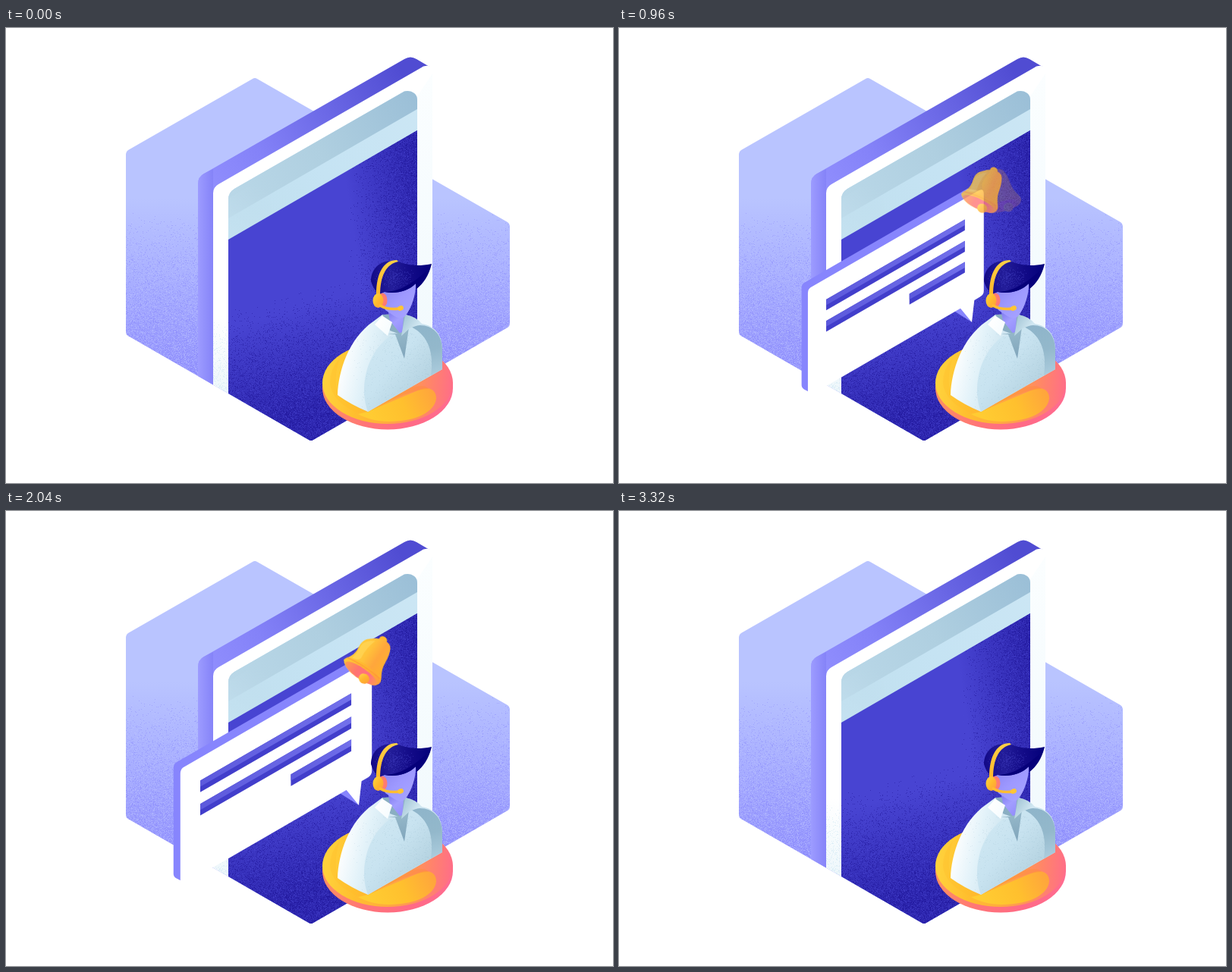
These frames come from a looping animation (800x600 px, 3.36 s). An HTML page with a canvas:

```html
<!DOCTYPE html>
<html lang="en">
<head>
<meta charset="utf-8">
<title>Support chat</title>
<style>
html, body { margin: 0; width: 100%; height: 100%; overflow: hidden; background: #fff; }
canvas { display: block; width: 800px; height: 600px; }
</style>
</head>
<body>
<canvas id="stage" width="800" height="600"></canvas>
<script>
const LOOP = 3360, STEP = 40;
const TIP = [465, 388], PIVOT = [500, 149];
const stage = document.getElementById('stage').getContext('2d');

let seed = 7;
const rnd = () => {
  seed = (Math.imul(seed, 1664525) + 1013904223) >>> 0;
  return seed / 4294967296;
};
const clamp = (x, a = 0, b = 1) => Math.min(b, Math.max(a, x));
const ease = x => x * x * (3 - 2 * x);
const part = (t, a, b) => clamp((t - a) / (b - a));
const P = d => new Path2D(d);

function layer() {
  const c = document.createElement('canvas');
  c.width = 800;
  c.height = 600;
  return c.getContext('2d');
}

function fill(g, d, style) {
  g.fillStyle = style;
  g.fill(P(d));
}

function line(g, d, style, width) {
  g.strokeStyle = style;
  g.lineWidth = width;
  g.lineCap = 'round';
  g.stroke(P(d));
}

function oval(g, x, y, rx, ry, style, turn = 0) {
  g.beginPath();
  g.ellipse(x, y, rx, ry, turn, 0, Math.PI * 2);
  g.fillStyle = style;
  g.fill();
}

function addStops(grad, colors) {
  colors.forEach((c, i) => grad.addColorStop(i / (colors.length - 1), c));
  return grad;
}
const lin = (g, x0, y0, x1, y1, ...c) => addStops(g.createLinearGradient(x0, y0, x1, y1), c);

// Speckled shading: density(x, y) is the chance of a dot on each pixel.
function grain(g, d, [x0, y0, x1, y1], color, density) {
  g.save();
  g.clip(P(d));
  g.fillStyle = color;
  for (let y = y0; y < y1; y++)
    for (let x = x0; x < x1; x++)
      if (rnd() < density(x, y)) g.fillRect(x, y, 1, 1);
  g.restore();
}

const HEX = 'M158 166Q158 163 161 161L325 67Q328 65 331 67L661 256Q664 258 664 261V390Q664 393 661 395L405 543Q402 545 399 543L161 406Q158 404 158 401Z';
const FLOOR = 'M0 0H800V315.5L405 543Q402 545 399 543L0 313Z';
const SIDE = 'M253 500V206Q253 196 261 192L525 41Q533 36 541 41L558 51L540 500Z';
const FACE = 'M273 500V218Q273 210 280 206L546 53Q551 49 557 50Q562 53 562 60V500Z';
const FOOT = 'M273 380H293V500H273Z';
const SCREEN = 'M293 560V226Q293 217 301 212L525 83.5Q533 82 538 86Q542 89 542 95V560Z';
const GLASS = 'M293 279L542 135V560H293Z';

function drawTablet(g) {
  fill(g, HEX, lin(g, 0, 225, 0, 450, '#b9c4ff', '#a8aeff', '#9494fd'));
  const low = (x, y) => 0.3 * part(y, 240, 430);
  grain(g, HEX, [158, 230, 664, 460], 'rgba(126,124,250,.35)', low);
  grain(g, HEX, [158, 250, 664, 460], 'rgba(190,198,255,.45)', low);

  g.save();
  g.clip(P(FLOOR));
  fill(g, SIDE, lin(g, 255, 240, 535, 80, '#9492ff', '#8482f8', '#6a67e5', '#504cd2'));
  fill(g, 'M253 500V206Q253 196 261 192L273 186V500Z', lin(g, 253, 0, 275, 0, 'rgba(158,157,255,.9)', 'rgba(128,126,246,.8)'));
  fill(g, FACE, '#fff');
  fill(g, 'M542 90L562 60V500H542Z', lin(g, 0, 60, 0, 400, '#fbfeff', '#f2fafd'));
  fill(g, FOOT, lin(g, 0, 380, 0, 480, '#fff', '#eef7fb'));
  grain(g, FOOT, [273, 380, 293, 490], 'rgba(200,228,242,.5)', (x, y) => 0.22 * part(y, 380, 480));

  fill(g, SCREEN, lin(g, 293, 260, 542, 115, '#c0dfee', '#c5e3f3', '#cbe6f4'));
  g.save();
  g.clip(P(SCREEN));
  fill(g, 'M293 251L542 107V70L293 205Z', lin(g, 293, 235, 542, 95, '#bad8e8', '#afcfe0', '#9bbfd7'));
  fill(g, 'M293 279L293 225L350 190V246Z', lin(g, 293, 270, 330, 205, 'rgba(200,228,243,.5)', 'rgba(190,218,233,0)'));
  g.restore();

  fill(g, GLASS, '#4844d2');
  fill(g, GLASS, lin(g, 455, 250, 550, 235, 'rgba(34,26,160,0)', 'rgba(34,26,160,.75)'));
  fill(g, GLASS, lin(g, 350, 380, 385, 505, 'rgba(34,26,160,0)', 'rgba(34,26,160,.7)'));
  const dark = (x, y) => Math.max(part(x, 450, 550), part(y + (x - 293) * 0.25, 370, 510));
  grain(g, GLASS, [293, 135, 542, 545], 'rgba(24,10,140,.4)', (x, y) => 0.28 * dark(x, y));
  grain(g, GLASS, [293, 135, 542, 545], 'rgba(74,71,212,.5)', (x, y) => 0.2 * dark(x, y));
  g.restore();
}

function drawDisc(g) {
  const rim = lin(g, 417, 0, 589, 0, '#ff8f60', '#ff7478', '#ff6a86', '#ff6c90');
  oval(g, 503, 475, 86, 54.5, rim);
  g.fillStyle = rim;
  g.fillRect(417, 467, 172, 8);
  oval(g, 503, 468, 86, 54, lin(g, 420, 450, 588, 462, '#ffd23c', '#ffbf2e', '#ffad3c', '#ff8f5c', '#ff6f86'));
  fill(g, 'M437 481Q431 462 440 435Q427 450 427 468Q429 494 469 510L477 506Z', 'rgba(255,184,40,.3)');
  fill(g, 'M477 506L545 477C557 472 567 477 567 488C566 505 542 519 505 519C490 519 474 515 464 509Z',
    lin(g, 480, 515, 567, 478, '#ffcc32', '#ffc02e', '#ffa23e'));
  fill(g, 'M477 506L535 474Q552 469 557 476Q536 475 477 506Z', 'rgba(255,140,64,.5)');
}

function drawBody(g) {
  const torso = 'M437 484C438 452 452 409 484 387L496 378L526 377L548 390C566 393 575 405 575 424V450L477 506Q455 497 437 484Z';
  fill(g, torso, lin(g, 440, 440, 505, 455, '#ffffff', '#e2f2f9', '#cbe3ef'));
  const front = 'M477 506C466 478 472 432 505 407L541 393C563 405 565 430 562 457Z';
  fill(g, front, lin(g, 480, 400, 560, 465, '#d0e8f3', '#c8e3f0', '#b4d2e0'));
  grain(g, torso, [437, 400, 575, 506], 'rgba(148,186,205,.2)', (x, y) => 0.12 * part(x, 450, 575));
  fill(g, 'M534 394C554 387 575 398 575 424V450L560 458.5C564 430 558 406 534 394Z',
    lin(g, 555, 392, 568, 455, '#8fb5ca', '#93b8cb', '#aacbdc'));
  fill(g, 'M496 378L526 377L540 388L520 404L506 399Z', '#8aaec2');
  fill(g, 'M503 370H525L522 406L506 386Z', lin(g, 503, 376, 522, 400, '#817cf0', '#a29eff', '#948ffb'));
  fill(g, 'M503 404L520 402L531 395L525 436L513 404Z', lin(g, 520, 395, 525, 436, '#98bacb', '#80a5bb'));
  fill(g, 'M526 378Q540 380 548 390L532 396L521 406Z', lin(g, 525, 382, 543, 394, '#a7c8d8', '#d2e8f2'));
  fill(g, 'M486 391L496 379.5L509 388L503 406Z', lin(g, 487, 390, 509, 402, '#fff', '#f4fbfe'));
}

function drawHead(g) {
  fill(g, 'M494 340L540 334C541 352 534 370 526 380Q521 385 512 380L500 372Q494 362 494 340Z',
    lin(g, 500, 345, 530, 378, '#8e88f5', '#9e99ff', '#a5a2ff'));
  const hair = 'M481 334C481 318 492 306 511 307C522 308 532 317 561 311C557 327 550 337 541 344L540 337C530 347 514 351 499 348L493 351Q485 347 481 334Z';
  fill(g, hair, lin(g, 480, 320, 561, 315, '#120987', '#231d99', '#120a87', '#03007a'));
  grain(g, hair, [482, 310, 545, 350], 'rgba(66,62,190,.45)',
    (x, y) => 0.5 * clamp(1 - Math.hypot((x - 514) / 30, (y - 329) / 15)));
  fill(g, 'M499 348C525 347 540 332 559 317C554 330 547 339 541 344L540 337C530 347 514 351 499 348Z', '#06007a');

  fill(g, 'M515 306C499 306 488 321 488 352L493 352C493 327 501 311 517 308Z', lin(g, 500, 306, 490, 350, '#ffd044', '#ffb82c'));
  oval(g, 496, 359, 6.5, 9.5, '#ff7b72');
  oval(g, 490.5, 359.5, 7, 9.5, lin(g, 484, 355, 498, 364, '#ffd03a', '#ffb92e', '#ff9f3c'));
  line(g, 'M493 366Q503 372 519 370', '#ffbd30', 3.5);
  oval(g, 520, 369.5, 4, 3.2, '#ffc534', -0.3);
}

function drawBubble(g) {
  fill(g, 'M195 334Q195 328 199 325.5L458 176L480 180L450 200L206 340V498L199 494.5Q195 492 195 488Z', '#8785fd');
  fill(g, 'M438 371L450 364L465 388Z', '#8785fd');
  fill(g, 'M205 342Q205 336 209 333L474 180Q484 174 484 184V338Q484 344 479 347L469 353L465 388L447 366L212 502Q205 506 205 497Z', '#fff');
  for (const [x, y] of [[234, 352], [234, 386], [366, 343]]) {
    const h = (454 - x) * 0.577;
    const bar = (a, b, c) => fill(g, `M${x} ${y + a}L454 ${y - h + a}V${y - h + b}L${x} ${y + b}Z`, c);
    bar(0, 17, '#423ecb');
    bar(0, 9, lin(g, x, 0, 454, 0, '#5c59dc', '#7270eb'));
  }
}

function drawBell(g) {
  oval(g, 500, 147, 6, 5, '#ffb62e', 0.35);
  const body = 'M450 187C458 180 464 177 467 166C469 156 474 151 482 149Q492 145 501 147Q513 150 513 158C514 170 509 179 508 188C507 196 510 202 509 208Q504 216 494 214C470 210 453 199 450 187Z';
  fill(g, body, lin(g, 464, 170, 510, 188, '#ffcb3a', '#ffc23a', '#ffa63c', '#ffb030'));
  fill(g, 'M470 162Q475 152 489 151Q478 164 474 180Q469 184 461 183Q467 174 470 162Z', 'rgba(255,221,100,.5)');
  oval(g, 479.5, 198, 31, 11, lin(g, 452, 188, 508, 208, '#ffc738', '#ffb52f', '#ff9d3d'), 0.4);
  line(g, 'M454 183Q477 187 507 203', 'rgba(255,151,53,.75)', 1.5);
  oval(g, 479, 201.5, 28, 8, lin(g, 455, 190, 505, 213, '#ff9b4e', '#ff746f', '#ff6f83', '#ffa143'), 0.4);
  oval(g, 484.5, 208, 8, 7.2, lin(g, 478, 203, 490, 214, '#ffce45', '#ffb52e', '#ffa136'), 0.4);
}

function turned(g, deg, alpha) {
  g.save();
  g.globalAlpha = alpha;
  g.translate(...PIVOT);
  g.rotate(deg * Math.PI / 180);
  g.translate(-PIVOT[0], -PIVOT[1]);
  g.drawImage(bell.canvas, 0, 0);
  g.restore();
}

function size(t) {
  if (t < 360) return 1 - (1 - part(t, 0, 320)) ** 2;
  if (t < 1880) return 1 - 0.169 * ease(part(t, 360, 720));
  if (t < 2280) return 0.831 + 0.169 * ease(part(t, 1880, 2230));
  return 1 - part(t, 2280, 2640) ** 2;
}

function ring(g, t) {
  if (t < 720 || t >= 2240) return turned(g, 0, 1);
  if (t >= 1920) return turned(g, 12 * (1 - ease(part(t, 2040, 2240))), 1);
  const swing = Math.cos((t - 1280) / 320 * Math.PI * 2);
  turned(g, -17 - 20 * swing, 0.22);
  turned(g, -17 + 20 * swing, 0.78);
}

const back = layer(), front = layer(), bell = layer();
drawTablet(back);
drawDisc(front);
drawBody(front);
drawHead(front);
drawBell(bell);

const start = performance.now();
function frame(now) {
  const t = Math.floor((Math.max(0, now - start) % LOOP) / STEP) * STEP;
  const s = size(t);
  stage.fillStyle = '#fff';
  stage.fillRect(0, 0, 800, 600);
  stage.drawImage(back.canvas, 0, 0);
  if (s > 0) {
    stage.save();
    stage.translate(...TIP);
    stage.scale(s, s);
    stage.translate(-TIP[0], -TIP[1]);
    drawBubble(stage);
    ring(stage, t);
    stage.restore();
  }
  stage.drawImage(front.canvas, 0, 0);
  requestAnimationFrame(frame);
}
frame(start);
</script>
</body>
</html>
```
